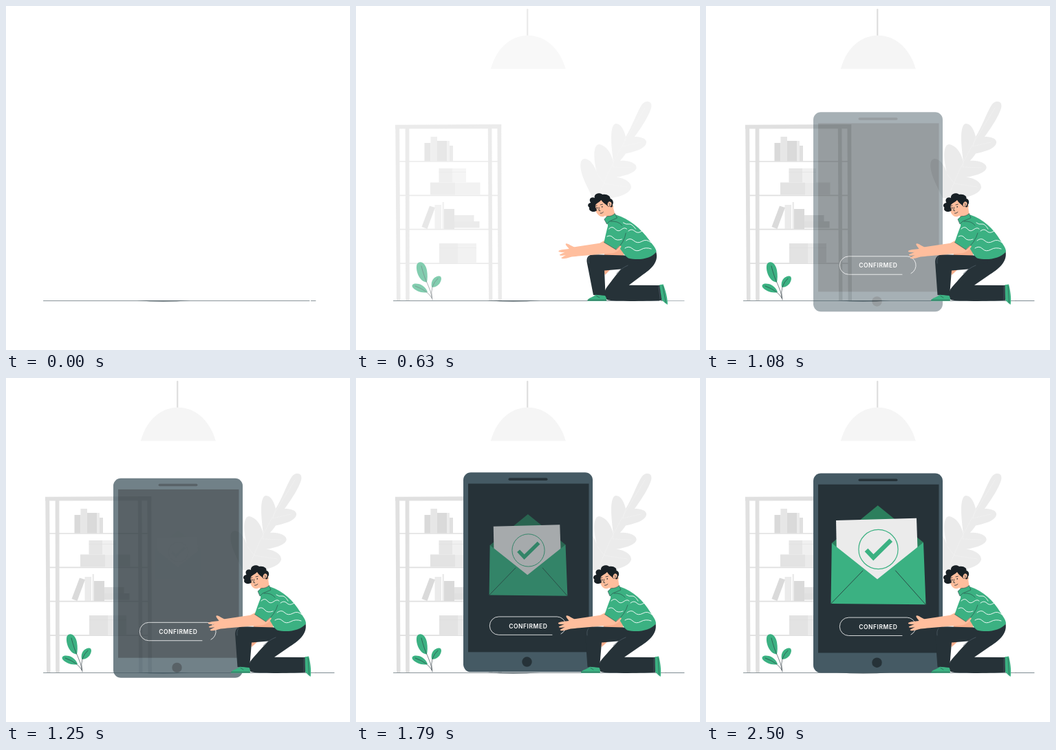
Write an HTML page that moves like this. It is 500 by 500 pixels and loops after 2.54 s.

```html
<!DOCTYPE html>
<html lang="en">
<head>
<meta charset="utf-8">
<title>Confirmed</title>
<style>
html, body { margin: 0; width: 100%; height: 100%; overflow: hidden; background: #fff; }
svg { display: block; width: 100%; height: 100%; }
.line { fill: none; stroke-linecap: round; }
.label { font: 600 8.5px Inter, "Open Sans", sans-serif; letter-spacing: .55px; fill: #fff; text-anchor: middle; }
</style>
</head>
<body>
<svg viewBox="0 0 500 500" xmlns="http://www.w3.org/2000/svg">
  <g id="room" opacity="0">
    <g id="shelf" fill="#e0e0e0">
      <path d="M57 172.8L211.3 172L211.3 178.2L57 178.6Z"/>
      <path d="M57.3 178H63.2L64.6 428H59ZM71.6 178H77.4L77.8 428H72.2ZM191.8 178H197.4L198.4 428H193ZM205.4 178H211.2L212 428H206.6Z"/>
      <path class="line" stroke="#e0e0e0" stroke-width="1.7" d="M63 226H207M63 275.3H207M63 324.7H207M63 374.2H207"/>
    </g>
    <rect x="248" y="4" width="2.4" height="40" rx="1.2" fill="#e0e0e0"/>
    <path fill="#f5f5f5" d="M195.8 91.5C203 64 223 42.7 250 42.7S297 64 304.8 91.5Z"/>
    <path fill="#ebebeb" d="M344 279C336 262 323 240 327 226C332 216 346 226 351 245C345 225 344 202 353 201C363 202 372 214 374.500 229C371 205 368 174 377 171C385 170 390 181 392 190C400 178 408 155 415 144C420 136 431 137 429.300 147C427 158 414 178 405 190C413 190 423 192 422 199C420 208 404 212 392 214.500C390 218 386 222 384 225C395 224 409 228 407.500 236C405 243 390 247 378 249C388 249 401 256 400 264C398 272 385 277 372 279Z"/>
    <path class="line" stroke="#f2f2f2" stroke-width=".6" d="M420 148C398 185 376 215 352 278M392 190L388 204L414 198M374 229L373 234L400 235M351 245L361 258L394 263"/>
    <g fill="#3bb182">
      <path d="M103 401.500C92 401 86 384 88.500 375.500C92 369 101 372 103 384C104.200 391 104 397 103 401.500Z"/>
      <path d="M110 408.500C108 399 114 393 120 392.400C126 392 124.500 400 120 405C117 408 113 409.500 110 408.500Z"/>
      <path d="M104 416C96 418 86 414 82 408.500C79.500 403 89 402 96 406C101 409 103 413 104 416Z"/>
    </g>
    <path class="line" stroke="#263238" stroke-width=".6" d="M95 378Q99 394 104 404T111 427M119 396Q107 407 110.500 424M86 407Q105 414 110.500 425"/>
    <path class="line" stroke="#455a64" stroke-width=".7" d="M450 428.500H477"/>
  </g>
  <path class="line" stroke="#56666e" stroke-width=".7" d="M54.500 428.500H441M443.500 428.500H450"/>
  <path fill="#37474f" d="M190 428.200H268Q228 430.600 190 428.200Z"/>

  <g id="phone" opacity="0">
    <rect x="156" y="138.500" width="188" height="290" rx="11" fill="#455a64"/>
    <rect x="163" y="154.700" width="175.500" height="244.800" fill="#263238"/>
    <rect x="221.500" y="146.500" width="57" height="3.600" rx="1.800" fill="#263238"/>
    <circle cx="248.500" cy="413.700" r="7.200" fill="#263238"/>
    <path class="line" stroke="#fff" stroke-width=".8" d="M285 374.500H207.500A13.200 13.200 0 0 1 207.500 348.100H292.300A13.200 13.200 0 0 1 298 373"/>
    <text class="label" x="250.300" y="364.700">CONFIRMED</text>
  </g>

  <g id="mail" opacity="0">
    <path fill="#2c7f5d" d="M182.800 240L249.700 185.300L316 239L310 270H190Z"/>
    <path fill="#ebebeb" d="M189 207L306 203.800L308 262L249 300L190 262Z"/>
    <path fill="#3bb182" d="M182.800 240L249 292.500L316 239L319.500 329.300L181.500 328Z"/>
    <path class="line" stroke="#263238" stroke-width=".8" d="M181.800 327.800L228 280M319 329L275.500 280"/>
    <circle cx="250.500" cy="249" r="28.600" fill="none" stroke="#3bb182" stroke-width="1.200"/>
    <path fill="none" stroke="#3bb182" stroke-width="6.500" d="M233 250L243.300 260.800L268.800 235.800"/>
  </g>

  <g id="man" opacity="0">
    <path fill="#f7ae8c" d="M368 351L389 350L388 363L357 391L356 381L360 360Z"/>
    <path fill="#3bb182" d="M434 405.500L440 404.500C442 412 444.300 425 442.700 434C439 432 436.500 428 434.500 427Z"/>
    <path fill="#263238" d="M435.500 357C438 372 426 382 410 392L390 405.800L434.500 406L435 427.700C410 429 366 429.800 356 427C350 423 353 413 359 407C366 399 374 390 380 384L397 364Z"/>
    <path fill="#263238" d="M406 363L345 361.300C336 361 332.500 366 333.200 374L336.500 420L354 421.500L357 384.500L381 382.500L410 372Z"/>
    <path class="line" stroke="#52616a" stroke-width=".7" d="M374 389Q382 381 392 377M433 407V426M338 364Q335 367 336 374"/>
    <path fill="#3bb182" d="M326.800 428.700C328 424 337 423 340 419.800L353.500 421C355.300 424 355.300 427.500 354.300 428.700Z"/>
    <path class="line" stroke="#263238" stroke-width=".5" d="M327.500 427.300H354.500M341 421.500L345 424M439 407L440.500 431"/>

    <path fill="#ffbe9d" d="M367 299L381 292L383 306L371 314Z"/>
    <path fill="#3bb182" d="M369 311L384 303.500C402 309 418 324 427.500 340C432 347 436 352 436 357C427 368 408 370 394 366.500C388 362 387 357 383 352L372 330Z"/>
    <path fill="#ffbe9d" d="M364 340L355 344.800L318 350.200C314 350 310 345 306 345.300C304 347 308 350 309.500 353C304 353.600 297 353.800 294 356C293 358 298 358.200 303 357.800L295 361.200C294 363.300 299 363.200 304 361.800L296.500 366C297.500 368.300 304 367 312 364.500C316 364.500 320 363.300 325 363.200L372 359.300C379 358 384 354 386 349Z"/>
    <path fill="#3bb182" d="M373 313C368 324 364.500 335 361.500 343.500L377.500 354C381 350 387 347 391 336C395 324 387 311 373 313Z"/>
    <path class="line" stroke="#263238" stroke-width=".5" d="M378 354Q391 344 395 330M375 313Q386 312 391 319M361.500 343.500L377.500 354"/>
    <path class="line" stroke="#fff" stroke-width=".9" d="M371 324q5 -5 9 0t9 1t8 -1M367 335q5 -3 9 2t12 2M393 315q4 3 8 2t9 7M399 327q5 -4 9 0t9 1t8 5M394 341q6 -5 11 0t12 1t13 2M391 352q6 -4 11 1t12 1t15 -1"/>
    <path fill="#3bb182" stroke="#263238" stroke-width=".5" d="M366 310L371 305.500Q378 306 382.500 301.500L385 308L373 313L369 317Z"/>

    <path fill="#ffbe9d" d="M354 285C352.500 293 355 302 360.500 305.500C365 308 370 304.500 373 299L382 292L379 280L362 277Z"/>
    <path fill="#182025" d="M357 297C352 301.500 344 298 346.500 293C343 290 346 286 349.500 286C346 280 352 276.500 356 279C355 273 364 270 368 274C374 272.500 379.500 276 378.500 280C383 281 383 287 380.500 289C381 292 379 293 377 292L374 291.500C371 288 367 286 365 282C361 286.500 355 287 355.500 292Z"/>
    <ellipse cx="376.500" cy="288" rx="2.800" ry="3.800" fill="#ffbe9d" transform="rotate(20 376.500 288)"/>
    <circle cx="357.600" cy="293.500" r=".9" fill="#263238"/>
    <circle cx="365.200" cy="291.800" r=".9" fill="#263238"/>
    <path class="line" stroke="#263238" stroke-width=".8" d="M355.500 290.800l2.500 -.8M363 289l3.300 -.8M360.500 292.500l-.6 5l1.800 .2M361.500 301.300q2.800 .4 4.500 -1.800M376 286.500q2 1 .5 4"/>
  </g>
</svg>
<script>
const NS = "http://www.w3.org/2000/svg";
const $ = id => document.getElementById(id);
const LOOP = 2540;

function box(x, y, w, h, fill) {
  const r = document.createElementNS(NS, "rect");
  Object.entries({ x, y, width: w, height: h, fill }).forEach(([k, v]) => r.setAttribute(k, v));
  $("shelf").append(r);
}

const pale = "#ebebeb", mid = "#e0e0e0", deep = "#dadada";
box(99.5, 199, 9, 26.500, deep);
box(108.500, 190, 9.500, 35.500, "#e6e6e6");
box(118, 196, 14.500, 29.500, deep);
box(132.500, 196, 3.500, 29.500, pale);
box(136, 203, 5, 22.500, mid);
box(120.500, 236, 19.500, 20.500, "#e6e6e6");
box(140, 236, 20, 20.500, "#f0f0f0");
box(120.500, 241, 39.500, .6, mid);
box(108, 256.500, 36, 18, "#e3e3e3");
box(144, 256.500, 36.500, 18, pale);
box(114.500, 289, 9.500, 35, pale);
box(125.500, 285, 2.500, 39, pale);
box(128, 295, 15, 29, deep);
box(143, 304, 28.500, 9, "#e3e3e3");
box(143, 313, 36.500, 9.500, mid);
box(121, 345, 27, 29, "#e3e3e3");
box(148, 345, 27, 29, pale);
box(121, 351, 54, .6, mid);
const lean = document.createElementNS(NS, "path");
lean.setAttribute("d", "M107 290.500L115 293L103.500 324L95.500 321Z");
lean.setAttribute("fill", deep);
$("shelf").append(lean);

const clamp = v => Math.min(1, Math.max(0, v));
const mix = (a, b, p) => a + (b - a) * p;

function bezier(x1, y1, x2, y2) {
  const at = (a, b, s) => 3 * (1 - s) * (1 - s) * s * a + 3 * (1 - s) * s * s * b + s * s * s;
  return x => {
    if (x <= 0 || x >= 1) return clamp(x);
    let lo = 0, hi = 1;
    for (let i = 0; i < 24; i++) {
      const m = (lo + hi) / 2;
      if (at(x1, x2, m) < x) lo = m; else hi = m;
    }
    return at(y1, y2, lo);
  };
}
const easeOut = bezier(0, 0, .58, 1);
const spring = bezier(.36, -.01, .5, 1.38);

function set(id, opacity, transform) {
  $(id).setAttribute("opacity", clamp(opacity));
  if (transform) $(id).setAttribute("transform", transform);
}

// Slides in leaning back, then swings forward and settles.
function lean3(t) {
  const p = easeOut(clamp(t / 600));
  if (t < 600) return { skew: mix(-20, 10, p), shift: 245 * (1 - p), alpha: p };
  const skew = t < 800
    ? mix(10, -2, easeOut((t - 600) / 200))
    : mix(-2, 0, easeOut(clamp((t - 800) / 200)));
  return { skew, shift: 0, alpha: 1 };
}

function draw(t) {
  set("room", t / 1000);

  const m = lean3(t);
  set("man", m.alpha, `translate(${m.shift} 352) skewX(${m.skew}) translate(0 -352)`);

  const rise = spring((t - 616) / 1250);
  set("phone", rise, `translate(0 ${30 * (1 - rise)})`);

  const zoom = spring((t - 1216) / 1270);
  set("mail", zoom, `translate(250.5 257.2) scale(${mix(.5, 1, zoom)}) translate(-250.5 -257.2)`);
}

const start = performance.now();
function tick(now) {
  draw(Math.max(0, now - start) % LOOP);
  requestAnimationFrame(tick);
}
draw(0);
requestAnimationFrame(tick);
</script>
</body>
</html>
```
